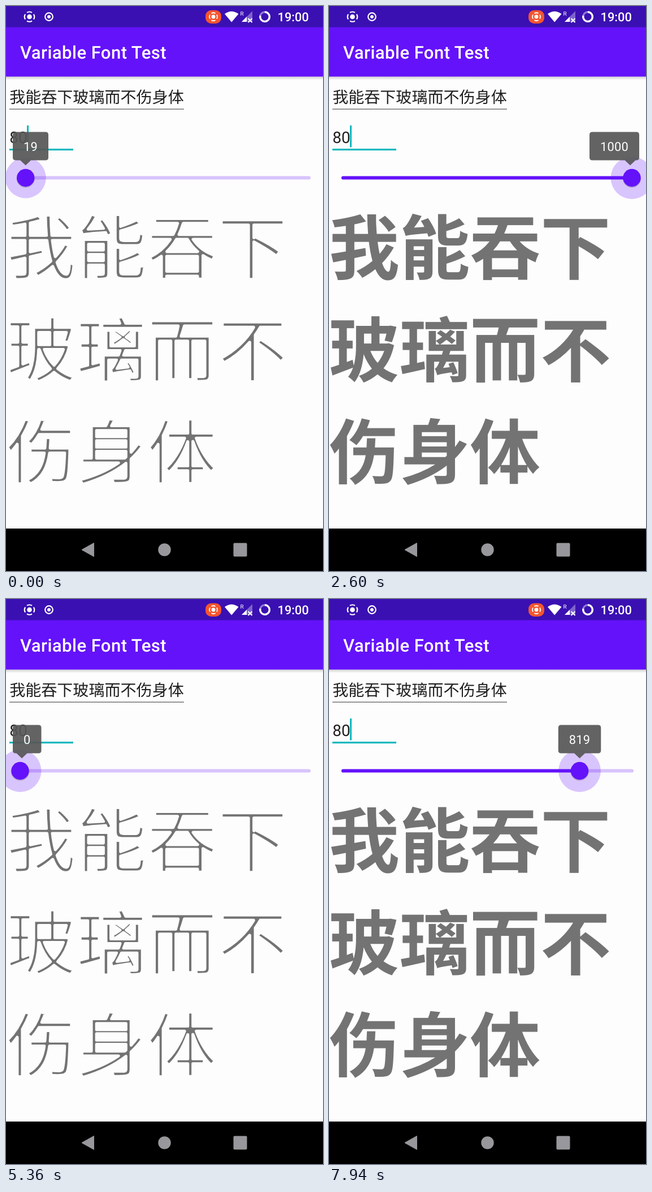
An HTML page for the animation above (8 s loop, 561 by 998 pixels).

```html
<!DOCTYPE html>
<html lang="zh-Hans">
<head>
<meta charset="utf-8">
<title>Variable Font Test</title>
<style>
  html, body { margin: 0; width: 100%; height: 100%; overflow: hidden; background: #fdfdfd; }
  svg { display: block; width: 100%; height: 100%; }
  text { font-family: Roboto, sans-serif; white-space: pre; text-rendering: geometricPrecision; }
  .cjk { font-family: "Noto Sans CJK SC", "Noto Sans SC", sans-serif; }
  .line { fill: none; stroke: #fff; }
</style>
</head>
<body>
<svg viewBox="0 0 561 998" preserveAspectRatio="none">
  <defs>
    <linearGradient id="shade" x2="0" y2="1">
      <stop stop-color="#000" stop-opacity=".18"/>
      <stop offset="1" stop-color="#000" stop-opacity="0"/>
    </linearGradient>
    <g id="rec">
      <circle r="4.300"/>
      <path class="line" stroke-width="2.2" d="M-4.5 -7.4A8.7 8.7 0 0 1 4.5 -7.4M-4.5 7.4A8.7 8.7 0 0 0 4.5 7.4M-7.4 -4.5A8.7 8.7 0 0 0 -7.4 4.5M7.4 -4.5A8.7 8.7 0 0 1 7.4 4.5"/>
    </g>
  </defs>

  <rect width="561" height="998" fill="#fdfdfd"/>

  <!-- bars -->
  <rect y="124.700" width="561" height="6" fill="url(#shade)"/>
  <rect width="561" height="38" fill="#3a10b2"/>
  <rect y="37.500" width="561" height="87.200" fill="#6412fa"/>
  <text x="25" y="93" font-size="31.17" font-weight="500" letter-spacing=".39" fill="#fff">Variable Font Test</text>

  <!-- status icons -->
  <g fill="#fff">
    <use href="#rec" x="41.5" y="19"/>
    <circle cx="76" cy="19" r="3"/>
    <circle class="line" cx="76" cy="19" r="6.8" stroke-width="2.2"/>
    <rect x="353" y="7.5" width="28" height="23.5" rx="10" fill="#f4552f"/>
    <use href="#rec" transform="translate(367 19) scale(.8)"/>
    <path d="M387 14Q399 5 411.500 14L399.200 28.500Z"/>
    <text x="414.500" y="16.500" font-size="10">R</text>
    <path d="M436 9V28H417Z" fill-opacity=".35"/>
    <path d="M426 19V28H417Z"/>
    <path class="line" stroke-width="2" d="M428.500 22L435.500 29M435.500 22L428.500 29"/>
    <circle class="line" cx="458" cy="19" r="8.300" stroke-width="3.200" stroke-opacity=".45"/>
    <path class="line" stroke-width="3.200" d="M458 10.700A8.300 8.300 0 1 1 449.900 17.200"/>
    <text x="480.500" y="27" font-size="21.800" font-weight="500">19:00</text>
  </g>

  <!-- fields -->
  <text class="cjk" x="6.200" y="171" font-size="28.05" fill="#1f1f1f">我能吞下玻璃而不伤身体</text>
  <rect x="6" y="181.500" width="309" height="1.300" fill="#606060"/>
  <text x="6.200" y="241.500" font-size="28.05" fill="#1f1f1f">80</text>
  <rect x="6" y="252" width="113" height="3.200" fill="#10b8be"/>
  <rect id="caret" x="37" y="211" width="3.100" height="38.500" fill="#10b8be"/>

  <!-- slider -->
  <g stroke-width="6.200" stroke-linecap="round">
    <path id="rest" stroke="#d8c4fc"/>
    <path id="done" stroke="#6412fa"/>
  </g>
  <circle id="halo" cy="303.500" r="37.400" fill="#6412fa" fill-opacity=".24"/>
  <circle id="shadow" cy="305" r="16" fill="#000" fill-opacity=".18"/>
  <circle id="thumb" cy="303.500" r="15.700" fill="#6412fa"/>

  <g id="sample" font-size="124.67" fill="#737373" stroke-linejoin="round"></g>

  <!-- value label -->
  <path id="bubble" fill="#585858" fill-opacity=".93"/>
  <text id="value" y="255.500" font-size="21.800" letter-spacing=".3" text-anchor="middle" fill="#fff"></text>

  <!-- navigation -->
  <rect y="923" width="561" height="75" fill="#000"/>
  <g fill="#98979b">
    <path d="M134 960.500L155.500 948.500V972.500Z" stroke="#98979b" stroke-linejoin="round"/>
    <circle cx="280.500" cy="960.500" r="11.200"/>
    <rect x="402.500" y="948.500" width="24" height="24" rx="2"/>
  </g>
</svg>
<script>
const LOOP = 8000, LEFT = 25, SPAN = 511, EM = 124.67;
const $ = id => document.getElementById(id);
const set = (el, attrs) => { for (const k in attrs) el.setAttribute(k, attrs[k]); };
const clamp = (v, lo, hi) => Math.min(hi, Math.max(lo, v));

// dragging bursts: start, end, number of updates
const bursts = [[70, 850, 11], [930, 1690, 10], [1780, 2140, 6], [3440, 4240, 11],
  [4320, 5120, 12], [5190, 5360, 4], [6810, 7550, 11], [7620, 7940, 5]];
// time and slider value
const drag = [[0, 19], [70, 40], [1183, 843], [1690, 965], [2000, 1000], [3380, 1000],
  [4392, 385], [5120, 30], [5300, 0], [6760, 0], [7328, 373], [7940, 819], [8000, 819]];
const blinks = [480, 1380, 1900, 2600, 3440, 4240, 5190, 6060, 6810, 7620];

// weight steps: the face to use and how much its strokes are scaled
const steps = [
  { weight: 100, face: 400, scale: .42 },
  { weight: 300, face: 400, scale: .75 },
  { weight: 400, face: 400, scale: 1 },
  { weight: 500, face: 400, scale: 1.2 },
  { weight: 700, face: 700, scale: 1 }
];

// Mean stroke width of a regular glyph: twice its area over its perimeter.
function strokeWidth(char) {
  const size = 140, c = document.createElement("canvas").getContext("2d");
  c.canvas.width = c.canvas.height = size;
  c.font = `400 ${EM}px "Noto Sans CJK SC", "Noto Sans SC", sans-serif`;
  c.fillText(char, 5, 115);
  const px = c.getImageData(0, 0, size, size).data;
  const ink = i => px[i * 4 + 3];
  let area = 0, edge = 0;
  for (let i = size; i < size * (size - 1); i++) {
    area += ink(i);
    edge += Math.hypot(ink(i + 1) - ink(i - 1), ink(i + size) - ink(i - size)) / 2;
  }
  return 2 * area / edge;
}

const glyphs = [];
["我能吞下", "玻璃而不", "伤身体"].forEach((row, r) => [...row].forEach((char, i) => {
  const el = document.createElementNS("http://www.w3.org/2000/svg", "text");
  el.textContent = char;
  set(el, { class: "cjk", x: i * EM, y: 473 + r * 180.5 });
  $("sample").append(el);
  glyphs.push({ el, width: strokeWidth(char) });
}));

function setWeight(v) {
  const gap = s => Math.abs(s.weight - v);
  const { face, scale } = steps.reduce((a, b) => gap(b) < gap(a) ? b : a);
  set($("sample"), {
    "font-weight": face,
    stroke: scale === 1 ? "none" : scale > 1 ? "#737373" : "#fdfdfd"
  });
  for (const g of glyphs) set(g.el, { "stroke-width": Math.abs(scale - 1) * g.width });
}

function stepped(t) {
  let held = 0;
  for (const [a, b, n] of bursts) {
    if (t < a) break;
    const gap = (b - a) / (n - 1);
    held = a + Math.min(n - 1, Math.floor((t - a + 10) / gap)) * gap;
  }
  return held;
}

function valueAt(t) {
  const i = Math.max(1, drag.findIndex(p => p[0] >= t));
  const [t0, v0] = drag[i - 1], [t1, v1] = drag[i];
  return Math.round(v0 + (v1 - v0) * (t - t0) / (t1 - t0));
}

function setLabel(x, v) {
  const w = 38 + 12.5 * String(v).length;
  const l = clamp(x - w / 2, 12, 549 - w), r = l + w;
  const tip = clamp(x, l + 16, r - 16);
  set($("bubble"), { d: `M${l + 5} 222.500H${r - 5}q5 0 5 5V267.500q0 5 -5 5H${tip + 9.5}L${tip} 281.500L${tip - 9.5} 272.500H${l + 5}q-5 0 -5 -5V227.500q0 -5 5 -5Z` });
  set($("value"), { x: l + w / 2 });
  $("value").textContent = v;
}

function draw() {
  const t = performance.now() % LOOP;
  const v = valueAt(stepped(t));
  const x = LEFT + SPAN * v / 1000;
  set($("halo"), { cx: x, r: t < 70 ? 36 : 37.4 });
  set($("thumb"), { cx: x });
  set($("shadow"), { cx: x });
  set($("done"), { d: `M${LEFT} 303.500H${x}` });
  set($("rest"), { d: `M${x} 303.500H${LEFT + SPAN}` });
  setLabel(x, v);
  setWeight(v);
  const flips = blinks.filter(b => t >= b).length;
  set($("caret"), { visibility: flips % 2 ? "hidden" : "visible" });
  requestAnimationFrame(draw);
}
draw();
</script>
</body>
</html>
```
